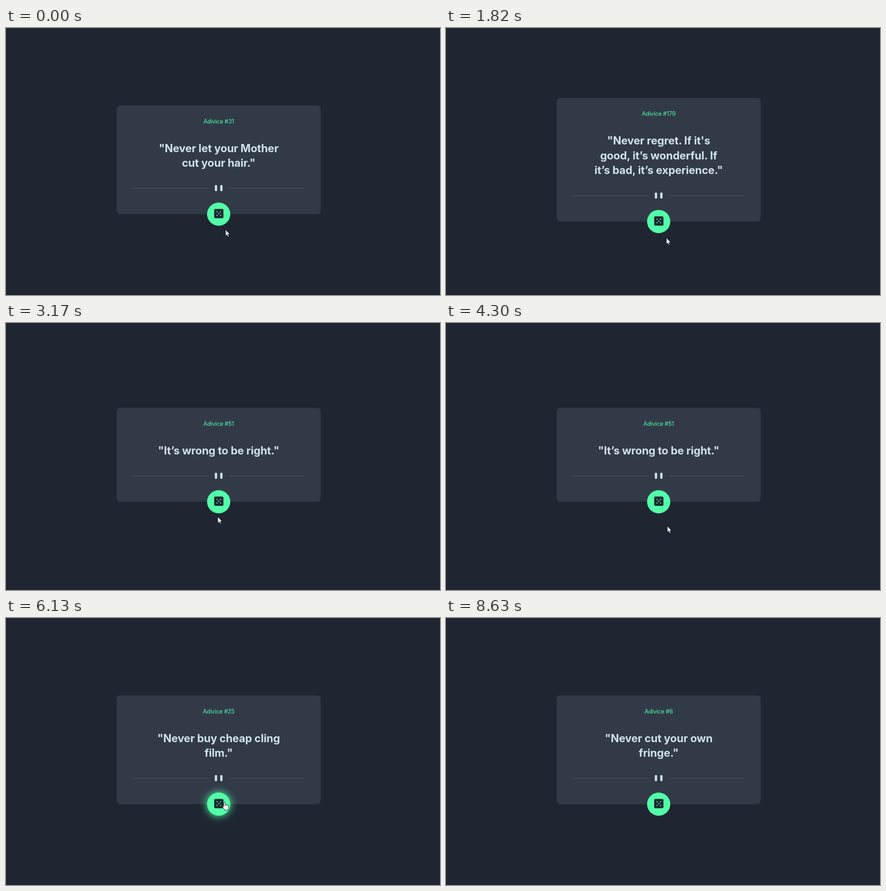
These frames come from a looping animation (953x587 px, 9360 ms). An HTML page:

```html
<!DOCTYPE html>
<html lang="en">
<head>
<meta charset="utf-8">
<title>Advice card</title>
<style>
  html, body { margin: 0; width: 100%; height: 100%; overflow: hidden; background: #1f2631; }
  svg { display: block; width: 953px; height: 587px; }
  text { font-family: Inter, "Open Sans", sans-serif; text-anchor: middle; }
  #label { font-size: 12.75px; letter-spacing: -.2px; fill: #52ffa8; }
  #quote { font-size: 23.8px; font-weight: 700; letter-spacing: -.15px; fill: #cee3e9; }
  #glow { filter: blur(9px); }
  .green { fill: #52ffa8; }
  .dark { fill: #1f2631; }
  .cursor { fill: #fff; stroke: #10141b; stroke-width: .9; stroke-linejoin: round; }
</style>
</head>
<body>
<svg viewBox="0 0 953 587">
  <rect id="card" x="243" width="448" rx="8" fill="#323a48"/>
  <text id="label" x="467"></text>
  <g id="quote"></g>
  <g id="foot">
    <path d="M279.5-56.7H445.5M489-56.7H655" stroke="#4d596d"/>
    <path d="M461.05-61.45v8.5M472.95-61.45v8.5" stroke="#cee3e9" stroke-width="5.1" stroke-linecap="round"/>
    <circle id="glow" class="green" cx="467" r="25.5"/>
    <circle class="green" cx="467" r="25.5"/>
    <rect class="dark" x="457.1" y="-11.4" width="20.4" height="20.4" rx="3.2"/>
    <g id="pips" class="green"></g>
  </g>
  <g id="pointer">
    <path id="arrow" class="cursor" d="M0 0V13.7L3.1 10.9L5.3 15.6L7.5 14.6L5.4 10H9.6Z"/>
    <g id="hand">
      <path class="cursor" d="M-1.7 10V1.2a1.5 1.5 0 0 1 3 0V5.8a1.4 1.4 0 0 1 2.5.4a1.4 1.4 0 0 1 2.5.5a1.3 1.3 0 0 1 2.2 1.1V12q0 2.3-1.5 3.8V17.5H-.3V16L-4 11.3q-1-1.5.2-2.2t2.1.9z"/>
      <path d="M1.3 6V9M3.8 6.5V9M6.3 7V9" stroke="#10141b" stroke-width=".7"/>
    </g>
  </g>
</svg>
<script>
const LOOP = 9360, TICK = 66, LINE = 32.4;
const SVG = 'http://www.w3.org/2000/svg';
const $ = id => document.getElementById(id);

const first = { id: 31, lines: ['"Never let your Mother', 'cut your hair."'] };
const home = [482, 443.5];

// Each round: the pointer enters, settles on aim, clicks for new advice, leaves for rest
const rounds = [
  { enter: 200, click: 1090, leave: 1620, aim: [464, 411], rest: [484, 461.5],
    id: 179, lines: ['"Never regret. If it\'s', 'good, it’s wonderful. If', 'it’s bad, it’s experience."'] },
  { enter: 2420, click: 3170, leave: 3770, aim: [465, 426], rest: [489, 454],
    id: 51, lines: ['"It’s wrong to be right."'] },
  { enter: 4300, click: 5530, leave: 6130, aim: [463, 389], rest: [502, 425],
    id: 25, lines: ['"Never buy cheap cling', 'film."'] },
  { enter: 6670, click: 7740, leave: 8070, aim: [469, 400], rest: [900, 610],
    id: 6, lines: ['"Never cut your own', 'fringe."'] }
];

function make(tag, parent, attrs) {
  const el = document.createElementNS(SVG, tag);
  for (const key in attrs) el.setAttribute(key, attrs[key]);
  return parent.appendChild(el);
}

for (const side of [-1, 1])
  for (const x of [-1, 0, 1])
    make('circle', $('pips'), { cx: 467.3 + x * 3.9, cy: -1.2 + x * side * 3.9, r: 1.25 });

// Ease-out move in discrete pointer samples
function glide(from, to, elapsed, span) {
  if (elapsed < 0) return from;
  const steps = Math.round(span / TICK) + 1;
  const p = Math.min(1, (Math.floor(elapsed / TICK) + 1) / steps);
  const ease = 1 - (1 - p) ** 2;
  return from.map((v, i) => v + (to[i] - v) * ease);
}

function pointerAt(t) {
  let pos = home;
  for (const { enter, click, leave, aim, rest } of rounds) {
    const distance = Math.hypot(rest[0] - aim[0], rest[1] - aim[1]);
    pos = glide(pos, aim, t - enter, click - 200 - enter);
    pos = glide(pos, rest, t - leave, 150 + distance * .8);
  }
  return pos;
}

// The card stays centred and grows with its lines
function layout({ lines }) {
  const height = 174.2 + lines.length * LINE;
  const top = 289.7 - height / 2;
  return { top, height, bottom: top + height };
}

let shown;
function showAdvice(item) {
  if (item === shown) return;
  shown = item;
  const { top, height, bottom } = layout(item);
  $('card').setAttribute('y', top);
  $('card').setAttribute('height', height);
  $('label').setAttribute('y', top + 39.3);
  $('label').textContent = 'Adivice #' + item.id;
  $('quote').replaceChildren();
  item.lines.forEach((line, i) => {
    make('text', $('quote'), { x: 467, y: top + 102.4 + i * LINE }).textContent = line;
  });
  $('foot').setAttribute('transform', `translate(0 ${bottom})`);
}

function toggle(id, on) {
  $(id).setAttribute('visibility', on ? 'visible' : 'hidden');
}

function draw(t) {
  const item = rounds.filter(r => r.click <= t).pop() || first;
  showAdvice(item);
  const [x, y] = pointerAt(t);
  const hover = Math.hypot(x - 467, y - layout(item).bottom) < 25.5;
  $('pointer').setAttribute('transform', `translate(${x} ${y})`);
  toggle('glow', hover);
  toggle('hand', hover);
  toggle('arrow', !hover);
}

const start = performance.now();
function tick() {
  draw((performance.now() - start) % LOOP);
  requestAnimationFrame(tick);
}
tick();
</script>
</body>
</html>
```
